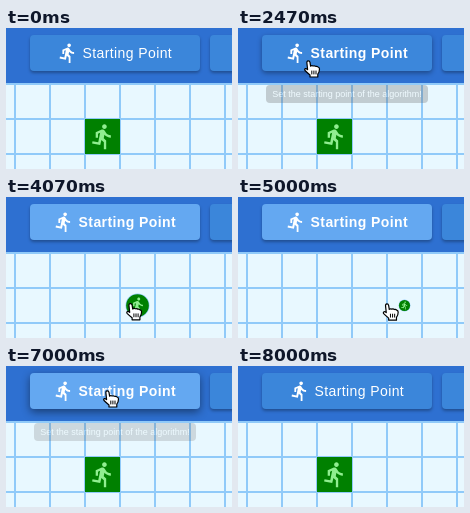
Animation, 226 px wide and 141 px high, one loop 8910 ms. Source, as an HTML page:

```html
<!DOCTYPE html>
<html lang="en">
<head>
<meta charset="utf-8">
<title>Starting Point</title>
<style>
  html, body { margin: 0; width: 100%; height: 100%; overflow: hidden; }
  svg { display: block; width: 226px; height: 141px; }
  text { font-family: "Liberation Sans", Arial, sans-serif; fill: #fff; }
  #label { font-size: 14px; letter-spacing: .4px; }
  #tip text { font-size: 9px; text-anchor: middle; }
  .button { filter: drop-shadow(0 2px 1.5px rgba(0, 0, 0, .3)); }
</style>
</head>
<body>
<svg viewBox="0 0 226 141">
  <defs>
    <path id="runner" d="M13.49 5.48c1.1 0 2-.9 2-2s-.9-2-2-2-2 .9-2 2 .9 2 2 2zm-3.6 13.9l1-4.4 2.1 2v6h2v-7.5l-2.1-2 .6-3c1.3 1.5 3.3 2.5 5.5 2.5v-2c-1.9 0-3.5-1-4.3-2.4l-1-1.6c-.4-.6-1-1-1.7-1-.3 0-.5.1-.8.1l-5.2 2.2v4.7h2v-3.4l1.8-.7-1.6 8.1-4.9-1-.4 2 7 1.4z"/>
    <pattern id="grid" x="9" y="56" width="35" height="35" patternUnits="userSpaceOnUse">
      <rect width="35" height="35" fill="#90caf9"/>
      <rect x="1" y="1" width="33" height="33" fill="#e8f8ff"/>
    </pattern>
  </defs>
  <rect width="226" height="141" fill="url(#grid)"/>
  <g id="marker">
    <rect id="edge" x="-18.5" y="-18.5" width="37" height="37" fill="#90caf9"/>
    <rect id="fill" x="-17.5" y="-17.5" width="35" height="35" fill="#008000"/>
    <use href="#runner" transform="translate(-13.8 -14) scale(1.167)" fill="#90ee90"/>
  </g>
  <rect width="226" height="55" fill="#2e70d1"/>
  <rect id="button" class="button" x="24" y="7" width="170" height="36" rx="4"/>
  <rect class="button" x="204" y="7" width="170" height="36" rx="4" fill="#3b86da"/>
  <g id="icon"><use href="#runner" transform="scale(.9)" fill="#fff"/></g>
  <text id="label" y="30">Starting Point</text>
  <g id="tip">
    <rect x="28" y="57" width="162" height="18" rx="4" fill="#616161" fill-opacity=".92"/>
    <text x="109" y="69">Set the starting point of the algorithm!</text>
  </g>
  <g id="cursor" fill="#fff" stroke="#000" stroke-linejoin="round" stroke-linecap="round">
    <g id="hand" stroke-width="1.2">
      <path d="M3.6 9.5L2.9 3Q2.6 1 4.2 .8Q5.7 .7 6 2.4L6.6 6.2Q7.6 5.2 9.2 6Q10.6 5.4 11.8 6.4Q13.2 6 14 7Q15.4 7.2 15.5 9Q15.5 12 13.8 14.2V17H6V15Q3 12.5 1 10.5Q.2 9.2 1.4 8.6Q2.5 8.4 3.6 9.5Z"/>
      <path d="M7.8 11V14M9.9 11V14M12 11V14" fill="none" stroke-width="1"/>
    </g>
    <path id="arrow" d="M.5 .5V16.5L4.3 13L6.7 18.6L9.2 17.5L6.8 12H12Z"/>
  </g>
</svg>
<script>
const LOOP = 8910, PULSE = 300, CELL = 35, GRID_LEFT = 9, HOME = 2;
const el = id => document.getElementById(id);
const clamp = v => Math.min(1, Math.max(0, v));
const ramp = (t, from, length) => clamp((t - from) / length);
const mix = (a, b, k) => a + (b - a) * k;
const glide = k => (1 - Math.cos(Math.PI * k)) / 2;
const pulse = (t, from, to, rise, fall) => ramp(t, from, rise) - ramp(t, to, fall);

// cubic-bezier(.25, .1, .25, 1)
function ease(x) {
  let lo = 0, hi = 1, s = .5;
  for (let i = 0; i < 18; i++) {
    s = (lo + hi) / 2;
    if (.75 * s * (1 - s) + s ** 3 < x) lo = s; else hi = s;
  }
  return .3 * s * (1 - s) ** 2 + 3 * s * s * (1 - s) + s ** 3;
}

const leg = (start, length, x, y) => ({ start, length, x, y });
// The drag swings right and left, reaching further each time.
const swings = Array.from({ length: 4 }, (_, i) =>
  leg(3780 + 455 * i, 375, i % 2 ? 74 : 128 + 11 * i, i % 2 ? 108 : 106));
const legs = [
  leg(330, 570, 72, 107),
  leg(1100, 100, 94.5, 112),
  leg(1600, 630, 66, 32),
  leg(2500, 570, 61.5, 104.5),
  ...swings,
  leg(6070, 200, 146, 104),
  leg(6470, 330, 97, 24),
  leg(7200, 630, 16, 7)
];

function cursorAt(t) {
  return legs.reduce((from, to) => {
    const k = glide(ramp(t, to.start, to.length));
    return { x: mix(from.x, to.x, k), y: mix(from.y, to.y, k) };
  }, { x: 174, y: 14 });
}

function columnAt(t) {
  const dragging = t >= 3330 && t < 6000;
  return dragging ? Math.floor((cursorAt(t).x + 5.5 - GRID_LEFT) / CELL) : HOME;
}

function drawCursor(t) {
  const { x, y } = cursorAt(t);
  const arrow = x < 24;
  el("cursor").style.display = t >= 330 && t < 8000 ? "" : "none";
  el("cursor").setAttribute("transform", `translate(${x} ${y})`);
  el("arrow").style.display = arrow ? "" : "none";
  el("hand").style.display = arrow ? "none" : "";
}

function drawMarker(t) {
  const column = columnAt(t);
  let age = 0;
  while (age < PULSE && columnAt(t - age) === column) age += 2;
  const p = clamp(age / PULSE);
  const scale = p < .75 ? mix(.3, 1.2, ease(p / .75)) : mix(1.2, 1, ease((p - .75) / .25));
  const radius = p < 1 ? Math.min(.5, 1 - ease(p)) : 0;
  const x = GRID_LEFT + CELL * (column + .5);
  el("marker").setAttribute("transform", `translate(${x} 108.5) scale(${scale})`);
  el("edge").setAttribute("rx", 37 * radius);
  el("fill").setAttribute("rx", 35 * radius);
}

function drawButton(t) {
  const bold = t >= 2460 && t < 7100;
  const lit = ease(ramp(t, 2460, 250)) - ease(ramp(t, 7100, 250));
  const lift = pulse(t, 2430, 2600, 100, 200) + pulse(t, 6900, 7150, 100, 200);
  const color = [[59, 100], [134, 168], [218, 241]].map(([a, b]) => Math.round(mix(a, b, lit)));
  el("button").setAttribute("fill", `rgb(${color})`);
  el("button").style.filter =
    `drop-shadow(0 ${2 + 1.5 * lift}px ${1.5 + 3 * lift}px rgba(0, 0, 0, ${.3 + .15 * lift}))`;
  el("label").setAttribute("font-weight", bold ? 700 : 400);
  el("label").setAttribute("x", bold ? 72.6 : 76.5);
  el("icon").setAttribute("transform", `translate(${bold ? 47 : 51} 14.2)`);
}

function drawTip(t) {
  el("tip").setAttribute("opacity",
    pulse(t, 2430, 2650, 130, 150) + pulse(t, 6640, 6970, 160, 40));
}

function draw(t) {
  drawCursor(t);
  drawMarker(t);
  drawButton(t);
  drawTip(t);
}

const begin = performance.now();
function tick() {
  draw((performance.now() - begin) % LOOP);
  requestAnimationFrame(tick);
}
tick();
</script>
</body>
</html>
```
